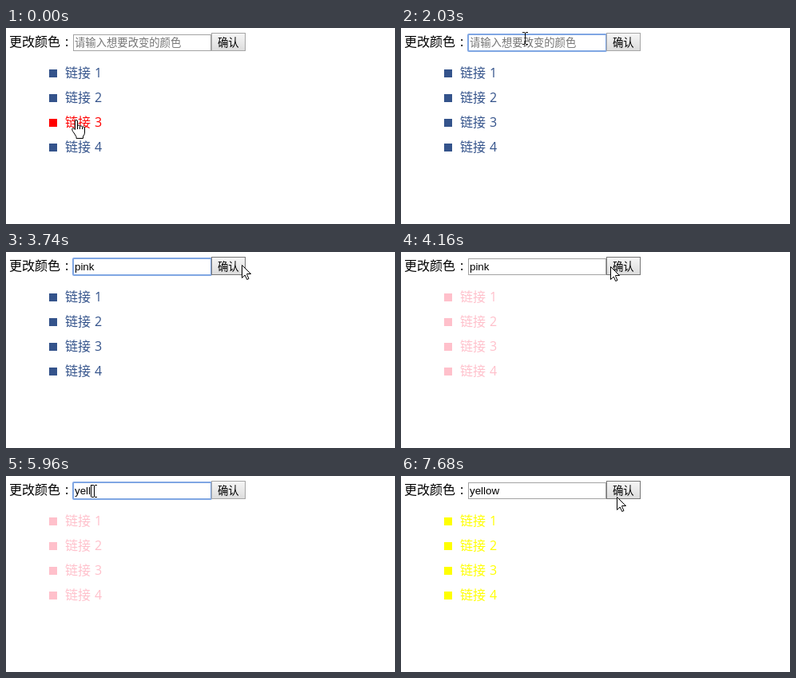
Recreate the animation shown at these times as an HTML page. Size 487 by 246 pixels, loop 8 s.

```html
<!DOCTYPE html>
<html lang="zh-CN">
<head>
<meta charset="utf-8">
<title>更改颜色</title>
<style>
  html, body { margin: 0; width: 100%; height: 100%; overflow: hidden; background: #fff; }
  svg { display: block; }
  text { white-space: pre; }
  .cjk { font: 16px "Noto Sans CJK SC", "Noto Sans CJK", "Noto Sans", sans-serif; }
  .num { font: 16px "Open Sans", "Noto Sans", sans-serif; }
  .small { font-size: 13.333px; }
  #value { font: 13.333px "Liberation Sans", Arial, sans-serif; }
  .cursor { fill: #fff; stroke: #000; }
</style>
</head>
<body>
<svg width="487" height="246" viewBox="0 0 487 246">
  <defs>
    <linearGradient id="face" x2="0" y2="1">
      <stop stop-color="#f6f6f6"/><stop offset="1" stop-color="#dcdcdc"/>
    </linearGradient>
    <linearGradient id="down" x2="0" y2="1">
      <stop stop-color="#dcdcdc"/><stop offset="1" stop-color="#f0f0f0"/>
    </linearGradient>
  </defs>
  <text class="cjk" x="4" y="23">更改颜色</text>
  <text class="num" x="74" y="23">:</text>
  <g id="list"></g>

  <rect x="84.5" y="8.5" width="172" height="20" fill="#fff" stroke="#a3a3a3"/>
  <rect id="ring" x="84" y="8" width="173" height="21" rx="1" fill="none" stroke="#7fa6e3" stroke-width="2"/>
  <text id="hint" class="cjk small" x="86" y="23" fill="#757575">请输入想要改变的颜色</text>
  <rect id="mark" x="86" y="11" width="24" height="15" fill="#3297fd"/>
  <text id="value" x="86" y="23"></text>
  <rect id="caret" y="11" width="1" height="15"/>

  <rect id="button" x="257.5" y="6.5" width="42" height="22"/>
  <text class="cjk small" x="265" y="23">确认</text>

  <path id="hand" class="cursor" d="M-1.5 12.5V2Q-1.5 .5 0 .5T1.5 2V8Q2 6.8 3.2 7 4.5 7 4.5 8.5 5 7.8 6.2 8 7.5 8 7.5 9.5 8 8.8 9.2 9 10.5 9 10.5 11V16Q10.5 19 8.5 21V23.5H0V21.5Q-2 18-4.5 14.5-5.5 12.5-5.2 11.5-4.5 10.5-3 11ZM1.5 8V12M4.5 9V12M7.5 10V12"/>
  <path id="arrow" class="cursor" d="M.5 .5V16.5L4.2 13 6.7 18.5 9 17.5 6.6 12.3V11.5H11.5Z"/>
  <path id="beam" fill="none" stroke="#000" d="M-3 -7.5H0M1 -7.5H4M.5 -7V7M-3 7.5H0M1 7.5H4"/>
</svg>
<script>
const BLUE = '#34538b', LOOP = 8000;
const $ = id => document.getElementById(id);
const show = (id, on) => { $(id).style.display = on ? '' : 'none'; };

// time, pointer, x, y, changed state
const steps = [
  [0, 'hand', 88, 115, { color: BLUE, hot: 3, text: '', focus: 0, caret: 0, mark: 0, btn: '' }],
  [430, 'hand', 88, 138, { hot: 4 }],
  [560, 'hand', 88, 146],
  [990, 'arrow', 128, 32, { hot: 1 }],
  [1140, 'beam', 136, 20, { hot: 0 }],
  [1280, 'beam', 144, 14],
  [1420, 'beam', 144, 14, { focus: 1, caret: 1 }],
  [1720, 'beam', 155, 13],
  [2030, 'beam', 155, 13, { caret: 0 }],
  [2340, 'beam', 155, 13, { text: 'p', caret: 1 }],
  [2490, 'beam', 155, 13, { text: 'pi' }],
  [2640, 'beam', 155, 13, { text: 'pin' }],
  [2790, 'beam', 155, 13, { text: 'pink', caret: 0 }],
  [3370, 'beam', 190, 15],
  [3500, 'beam', 240, 17],
  [3630, 'arrow', 284, 15, { btn: 'hover' }],
  [3740, 'arrow', 295, 16],
  [3880, 'arrow', 291, 17, { btn: 'down', focus: 0 }],
  [4020, 'arrow', 290, 17, { btn: 'hover', color: 'pink' }],
  [4150, 'arrow', 262, 18],
  [4290, 'beam', 190, 18, { btn: '' }],
  [4430, 'beam', 130, 17],
  [4560, 'beam', 112, 16, { focus: 1 }],
  [4680, 'arrow', 108, 4],
  [4840, 'arrow', 81, 0, { mark: 1 }],
  [5130, 'beam', 110, 19],
  [5540, 'beam', 110, 19, { text: 'y', mark: 0, caret: 1 }],
  [5680, 'beam', 110, 19, { text: 'ye' }],
  [5820, 'beam', 110, 19, { text: 'yel' }],
  [5960, 'beam', 110, 19, { text: 'yell' }],
  [6230, 'beam', 110, 19, { text: 'yello' }],
  [6660, 'beam', 110, 19, { text: 'yellow' }],
  [6980, 'beam', 145, 19, { caret: 0 }],
  [7120, 'beam', 205, 20],
  [7260, 'arrow', 261, 22, { btn: 'hover' }],
  [7400, 'arrow', 270, 24, { btn: 'down', focus: 0 }],
  [7540, 'arrow', 270, 25, { btn: 'hover', color: 'yellow' }],
  [7680, 'arrow', 270, 26]
];

let last = {};
const states = steps.map(([t, pointer, x, y, change]) =>
  last = { ...last, ...change, t, pointer, x, y });

$('list').innerHTML = [1, 2, 3, 4].map(n => `
  <g transform="translate(54 ${31 * n + 21})">
    <rect width="10" height="10"/>
    <text class="cjk" x="20" y="10">链接</text>
    <text class="num" x="57" y="10">${n}</text>
  </g>`).join('');
const items = [...$('list').children];

function draw(s) {
  items.forEach((item, i) => item.setAttribute('fill', s.hot === i + 1 ? 'red' : s.color));
  show('ring', s.focus);
  show('hint', !s.text);
  show('mark', s.mark);
  show('caret', s.caret);
  $('value').textContent = s.text;
  $('value').setAttribute('fill', s.mark ? '#fff' : '#000');
  const width = s.text ? $('value').getComputedTextLength() : 0;
  $('caret').setAttribute('x', Math.floor(86.05 + width));
  $('button').setAttribute('fill', s.btn === 'down' ? 'url(#down)' : 'url(#face)');
  $('button').setAttribute('stroke', s.btn ? '#777' : '#a6a6a6');
  for (const id of ['hand', 'arrow', 'beam']) show(id, id === s.pointer);
  $(s.pointer).setAttribute('transform', `translate(${s.x} ${s.y})`);
}

let shown;
const start = performance.now();
function tick() {
  const t = (performance.now() - start) % LOOP;
  const now = states.filter(s => s.t <= t).pop();
  if (now !== shown) draw(shown = now);
  requestAnimationFrame(tick);
}
tick();
</script>
</body>
</html>
```
